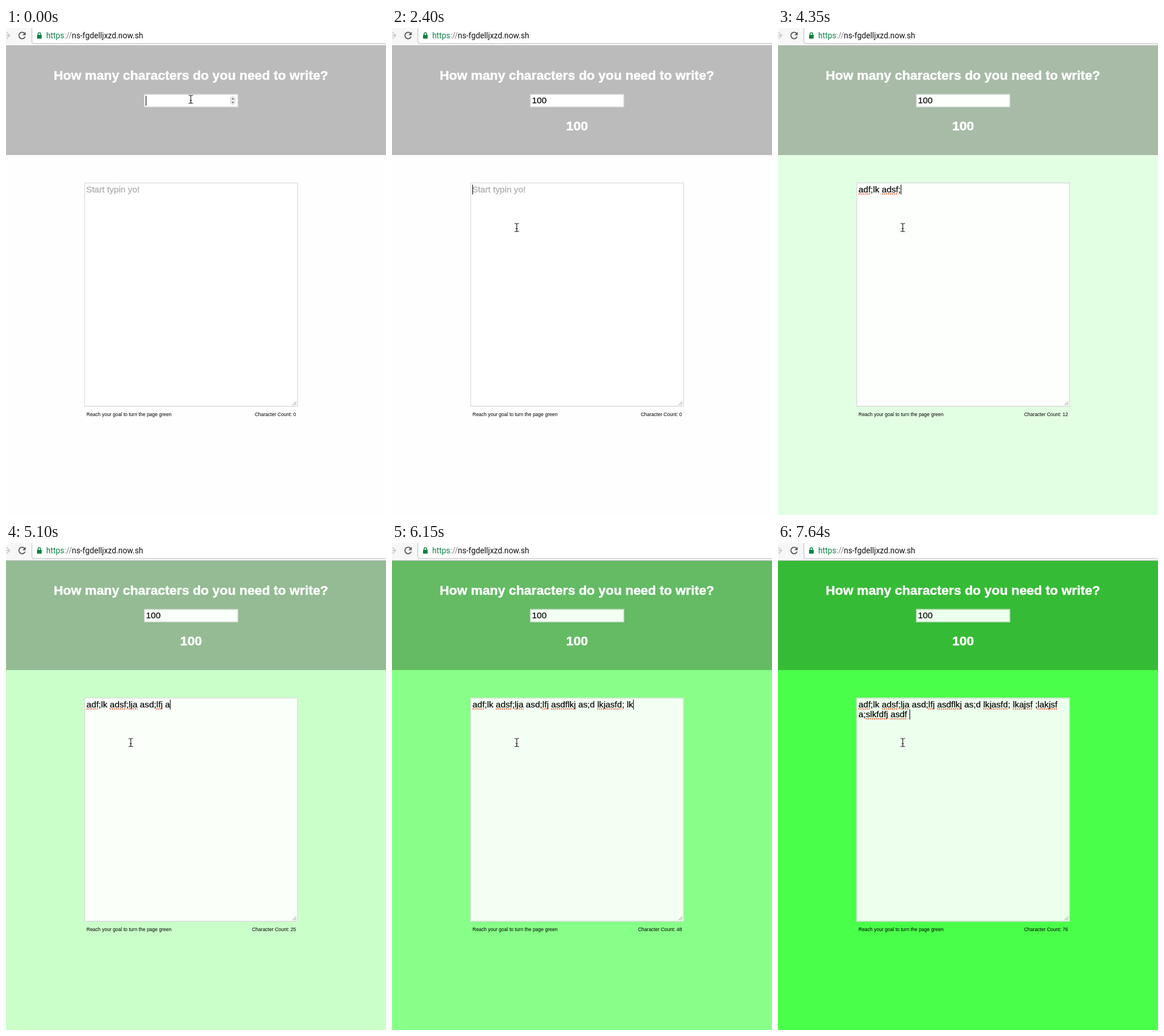
These frames come from a looping animation (661x847 px, 8000 ms). An HTML page with a canvas:

```html
<!DOCTYPE html>
<html lang="en">
<head>
<meta charset="utf-8">
<title>Character goal</title>
<style>
  html, body { margin: 0; width: 100%; height: 100%; overflow: hidden; background: #fff; }
  canvas { display: block; }
</style>
</head>
<body>
<canvas id="stage" width="661" height="847"></canvas>
<script>
const ctx = document.getElementById('stage').getContext('2d');
const LOOP = 8000;
const SANS = '"Liberation Sans", Arial, sans-serif';
const BODY = `15.2px ${SANS}`, TITLE = `bold 22.8px ${SANS}`, SMALL = `8.5px ${SANS}`;
const TYPED = 'adf;lk adsf;lja asd;lfj asdflkj as;d lkjasfd; lkajsf ;lakjsf a;slkfdfj asdf ';
const LINE_END = 61, LINE_FITS = 63;

// [time, characters typed so far]
const KEYS = [
  [0, 0], [2850, 1], [3000, 2], [3450, 5], [3600, 6],
  [3900, 7], [4050, 8], [4200, 10], [4350, 12], [4500, 14], [4650, 15], [4800, 17],
  [4950, 19], [5100, 25], [5250, 31], [5400, 34], [5550, 37], [5700, 40], [5850, 43],
  [6000, 46], [6150, 48], [6300, 50], [6450, 52], [6600, 54], [6740, 57], [6890, 63], [7040, 64],
  [7190, 65], [7340, 67], [7490, 69], [7640, 76]
];

function text(str, x, y, font, color, align = 'left', weight = 0) {
  ctx.font = font;
  ctx.fillStyle = ctx.strokeStyle = color;
  ctx.textAlign = align;
  ctx.fillText(str, x, y);
  if (weight) {
    ctx.lineWidth = weight;
    ctx.strokeText(str, x, y);
  }
  return ctx.measureText(str).width;
}

function rect(x, y, w, h, color) {
  ctx.fillStyle = color;
  ctx.fillRect(x, y, w, h);
}

function path(d, color, width = 1) {
  ctx.strokeStyle = color;
  ctx.lineWidth = width;
  ctx.stroke(new Path2D(d));
}

function shape(d, color) {
  ctx.fillStyle = color;
  ctx.fill(new Path2D(d));
}

function roundBox(x, y, w, h, radius, fill, stroke) {
  ctx.beginPath();
  ctx.roundRect(x, y, w, h, radius);
  ctx.fillStyle = fill;
  ctx.fill();
  ctx.strokeStyle = stroke;
  ctx.lineWidth = 1;
  ctx.stroke();
}

function field(x, y, w, h, pageColor) {
  rect(x, y, w, h, 'rgba(221,221,221,.9)');
  for (const color of [pageColor, 'rgba(255,255,255,.9)'])
    rect(x + 1.7, y + 1.7, w - 3.4, h - 3.4, color);
}

function toolbar() {
  rect(0, 0, 661, 30, '#f7f7f7');
  rect(0, 30, 661, 1, '#b9b9b9');
  roundBox(45, -6, 640, 33, 3, '#fff', '#b9b9b9');
  path('M-4 13H6M1 7.5L6.5 13L1 18.5', '#c8c8c8', 1.7);
  path('M32.3 9.3A5.6 5.6 0 1 0 33.3 15', '#5a5a5a', 1.9);
  shape('M34.3 6.8V12.6H28.5Z', '#5a5a5a');
  shape('M54 12H62V18.5H54Z', '#0b8043');
  path('M55.7 12.5V10.5A2.3 2.3 0 0 1 60.3 10.5V12.5', '#0b8043', 1.4);
  let x = 70;
  for (const [part, color] of [['https', '#0b8043'], ['://', '#808080'], ['ns-fgdelljxzd.now.sh', '#111']])
    x += text(part, x, 18, '13.75px Roboto, sans-serif', color);
}

function spinner() {
  roundBox(390.5, 119.5, 8, 13, 3.5, '#fafafa', '#c6c6c6');
  path('M392.7 124.3L394.5 122.2L396.3 124.3M392.7 128L394.5 130.1L396.3 128', '#444', 1.1);
}

function pointer(x, y) {
  ctx.save();
  ctx.translate(x, y);
  const beam = 'M-4 -7H-2Q0 -7 0 -5V5Q0 7 -2 7H-4M4 -7H2Q0 -7 0 -5V5Q0 7 2 7H4M-2 2H2';
  path(beam, 'rgba(255,255,255,.7)', 2.6);
  path(beam, '#222', 1.2);
  ctx.restore();
}

const caret = (x, y) => rect(x, y, 1.1, 17, '#000');

function typedLine(start, end, count, y) {
  const line = TYPED.slice(start, end);
  const width = text(line, 140, y, BODY, '#000', 'left', .2);
  ctx.setLineDash([2, 1.5]);
  for (const { 0: word, index } of line.matchAll(/\w+/g)) {
    const finished = start + index + word.length < count;
    if (word.length < 3 || word === 'asd' || !finished) continue;
    const from = 140 + ctx.measureText(line.slice(0, index)).width;
    path(`M${from} ${y + 2.5}H${from + ctx.measureText(word).width}`, '#f2552c', 1.9);
  }
  ctx.setLineDash([]);
  return 140 + width;
}

function draw(t) {
  const step = KEYS.findLastIndex(key => key[0] <= t);
  const count = KEYS[step][1];
  // the page colour eases towards the counter, so it trails behind
  const before = KEYS[Math.max(0, step - 1)][1];
  const level = before + .2 * (count - before);
  const tint = Math.round(254 - 2.55 * level);
  const pageColor = `rgb(${tint},${count ? 255 : 254},${tint})`;

  rect(0, 0, 661, 847, pageColor);
  rect(0, 30, 661, 191, '#0004');
  toolbar();

  const goal = '100'.slice(0, t < 300 ? 0 : t < 450 ? 1 : t < 600 ? 2 : 3);
  text('How many characters do you need to write?', 321.7, 89.5, TITLE, '#fff', 'center', .5);
  text(goal, 322, 178, TITLE, '#fff', 'center', .5);
  field(240, 114.7, 164, 23.3, pageColor);
  const goalWidth = text(goal, 243.5, 131.3, BODY, '#000', 'left', .2);
  if (t < 1050) caret(243 + goalWidth, 118);
  if (t < 1350) spinner();

  field(136, 268.7, 372, 390, pageColor);
  path('M498.5 656L505 649.5M502 656L505 653', '#888', 1);
  if (!count) {
    text('Start typin yo!', 139.5, 286, BODY, '#b2b2b2', 'left', .4);
    if (t >= 1350 && t < 1800 || t >= 2400) caret(139.7, 272.5);
  } else {
    const wrapped = count > LINE_FITS;
    let x = typedLine(0, wrapped ? LINE_END : count, count, 286);
    if (wrapped) x = typedLine(LINE_END, count, count, 303.3);
    caret(x, wrapped ? 290 : 272.5);
  }

  text('Reach your goal to turn the page green', 140, 675, SMALL, '#000');
  text(`Character Count: ${count}`, 504.5, 675, SMALL, '#000', 'right');

  if (t < 900) pointer(321.5, 124);
  else if (t < 1050) pointer(268, 240);
  else pointer(217, 347);
}

function tick(now) {
  draw(now % LOOP);
  requestAnimationFrame(tick);
}
requestAnimationFrame(tick);
</script>
</body>
</html>
```
